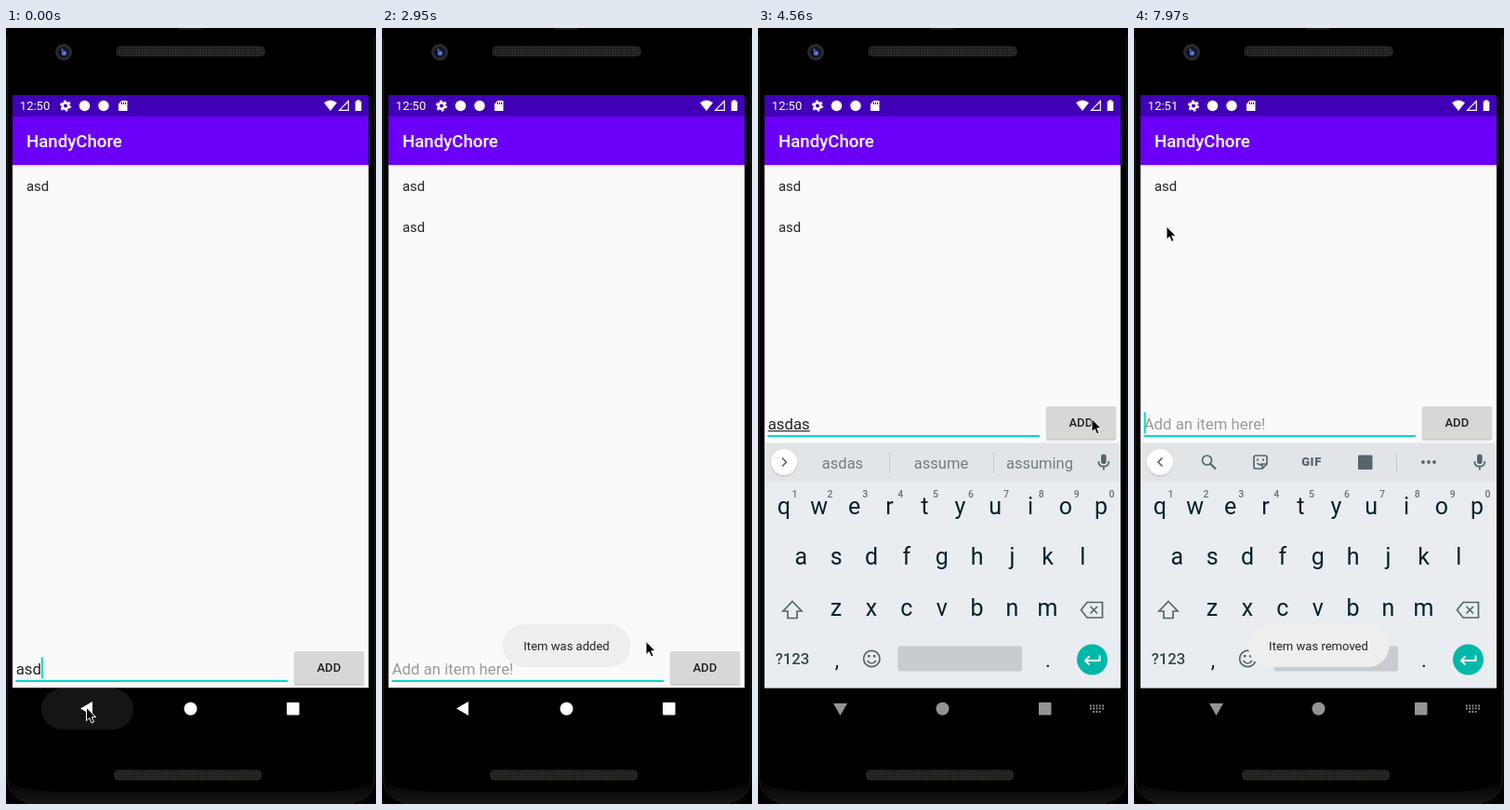
Recreate the animation shown at these times as an HTML page. Size 398 by 833 pixels, loop 8 s.

```html
<!DOCTYPE html>
<html lang="en">
<head>
<meta charset="utf-8">
<title>To-do app on a phone</title>
<style>
html, body { margin: 0; width: 100%; height: 100%; overflow: hidden; background: #000; }
svg { display: block; width: 398px; height: 833px; font-family: Roboto, "Open Sans", sans-serif; }
.mid { text-anchor: middle; }
.item { font-size: 14.9px; fill: #252525; }
.field { font-size: 16.78px; }
.small { font-size: 13.05px; }
.bold { font-weight: 500; }
.key { font-size: 25px; fill: #05212c; }
.hintkey { font-size: 10.5px; fill: #65727a; font-weight: 500; }
.word { font-size: 16.5px; fill: #727c82; }
.line { fill: none; stroke: #56646c; stroke-width: 1.7; }
</style>
</head>
<body>
<svg viewBox="0 0 398 833">
  <defs>
    <pattern id="mesh" width="3" height="3" patternUnits="userSpaceOnUse">
      <rect width="3" height="3" fill="#2a2a28"/><rect width="1.6" height="1.6" fill="#131312"/>
    </pattern>
    <linearGradient id="chin" x2="0" y2="1">
      <stop offset="0" stop-color="#030303"/><stop offset="1" stop-color="#171717"/>
    </linearGradient>
    <linearGradient id="shade" x2="0" y2="1">
      <stop offset="0" stop-opacity=".14"/><stop offset="1" stop-opacity="0"/>
    </linearGradient>
    <clipPath id="screen"><path d="M7 72H390V750H7Z"/></clipPath>
  </defs>

  <!-- phone body -->
  <rect width="398" height="833" fill="#000"/>
  <path d="M1.5 10V806Q3 826 24 832H374Q395 826 396.5 806V10" fill="none" stroke="#161616" stroke-width="1.5"/>
  <path d="M3 808Q20 820 60 820H338Q378 820 395 808Q392 826 374 833H24Q6 826 3 808Z" fill="url(#chin)"/>
  <path d="M185 0H211V2H185Z" fill="#151515"/>
  <rect x="119" y="20" width="159" height="10" rx="4" fill="url(#mesh)" stroke="#2c2c2b"/>
  <rect x="116.500" y="797" width="158" height="10" rx="4" fill="url(#mesh)" stroke="#2c2c2b"/>
  <circle cx="62" cy="26" r="9" fill="#2a2a2c"/>
  <circle cx="62" cy="26" r="6" fill="#10142a"/>
  <circle cx="62.500" cy="27" r="2.600" fill="#5672c4"/>
  <circle cx="60.500" cy="23.500" r="1" fill="#8792b8"/>

  <!-- app -->
  <path d="M7 147H390V708.500H7Z" fill="#fafafa"/>
  <path d="M7 147H390V150H7Z" fill="url(#shade)"/>
  <path d="M7 72H390V95H7Z" fill="#3f00b6"/>
  <path d="M7 95H390V147H7Z" fill="#6a00f7"/>
  <g fill="#fff">
    <text id="clock" class="small" x="14.800" y="88.300"></text>
    <circle cx="64" cy="83.500" r="3.300" fill="none" stroke="#fff" stroke-width="2.600"/>
    <circle cx="64" cy="83.500" r="5.200" fill="none" stroke="#fff" stroke-width="1.800" stroke-dasharray="2.720 2.725"/>
    <circle cx="84.500" cy="83.500" r="5.700"/>
    <circle cx="105" cy="83.500" r="5.700"/>
    <path d="M124.500 78H130.500V89H121V81.500Z"/>
    <path d="M124.500 79.500V82M126.500 79.500V82M128.500 79.500V82" stroke="#3f00b6"/>
    <path d="M342 80.300Q349 74.700 356 80.300L349 89Z"/>
    <path d="M358.500 88.300L368.300 78.500V88.300Z" fill="none" stroke="#fff" stroke-width="1.200"/>
    <path d="M375.700 78.500H377.700V77H380.300V78.500H382.300V89H375.700Z"/>
    <text class="bold" x="22" y="127.700" font-size="18.640">HandyChore</text>
  </g>
  <text class="item" x="22" y="174.700">asd</text>
  <text id="second" class="item" x="22" y="219.400">asd</text>
  <text id="third" class="item" x="22">asdas</text>

  <!-- input row -->
  <g id="row">
    <text id="entry" class="field" x="10.700" y="693.500"></text>
    <path id="compose" fill="#333"/>
    <path d="M10.500 700H303V702H10.500Z" fill="#03dac5"/>
    <rect id="caret" y="675.500" width="1.900" height="23" fill="#03dac5"/>
    <rect x="309.500" y="670.500" width="76" height="36" rx="2.500" fill="#000" opacity=".1"/>
    <rect x="310" y="669.500" width="75" height="35.500" rx="2" fill="#000" opacity=".12"/>
    <rect x="310" y="669" width="75" height="35" rx="2" fill="#d6d7d7"/>
    <rect id="press" x="310" y="669" width="75" height="35" rx="2" fill="#000"/>
    <text class="small bold mid" x="347.300" y="691.200" fill="#222">ADD</text>
  </g>

  <path d="M7 708.500H390V750H7Z" fill="#000"/>
  <rect id="ripple" x="38" y="709" width="99" height="44" rx="22" fill="#151515"/>

  <!-- keyboard -->
  <g clip-path="url(#screen)">
    <g id="board">
      <path d="M7 445.500H390V708.500H7Z" fill="#e9edf1"/>
      <path d="M7 445.500H390V487H7Z" fill="#e1e5e8"/>
      <circle cx="28" cy="467" r="14.500" fill="#000" opacity=".12"/>
      <circle cx="28" cy="466" r="14" fill="#fff"/>
      <path id="chevron" class="line"/>
      <g id="words">
        <path d="M141.500 455V478M253.500 455V478" stroke="#c4c9cc"/>
        <text class="word mid" x="91" y="472.500"></text>
        <text class="word mid" x="197" y="472.500"></text>
        <text class="word mid" x="303" y="472.500"></text>
      </g>
      <g id="tools" fill="#56646c">
        <circle class="line" cx="78.500" cy="464" r="5"/>
        <path class="line" d="M82 467.500L88 473.500" style="stroke-width:2.200"/>
        <path class="line" d="M131 459H141Q143 459 143 461V468L138 473H131Q129 473 129 471V461Q129 459 131 459ZM138 473V468H143M132.500 467Q135 470 137.500 468"/>
        <path d="M132 462.500H134V464.500H132ZM138 462.500H140V464.500H138Z"/>
        <text class="mid" x="191" y="470.300" font-size="13" font-weight="900" letter-spacing=".6">GIF</text>
        <rect x="241" y="458.500" width="15.500" height="15.500" rx="1"/>
        <path d="M282.500 456V476" stroke="#c4c9cc"/>
        <circle cx="311" cy="466" r="1.900"/><circle cx="317" cy="466" r="1.900"/><circle cx="323" cy="466" r="1.900"/>
      </g>
      <rect x="369" y="457.500" width="5.600" height="10.500" rx="2.800" fill="#56646c"/>
      <path class="line" d="M366.300 465Q366.300 470.700 371.800 470.700Q377.300 470.700 377.300 465M371.800 470.700V474.500"/>
      <g id="keys"></g>
      <path class="line" d="M37 615.500L47 626H42V633.500H32V626H27Z"/>
      <path class="line" d="M354 616.500H370.500V633H354L347.500 624.700ZM357.500 621L365 628.500M365 621L357.500 628.500"/>
      <text class="mid bold" x="37" y="683" font-size="16.700" fill="#34474f">?123</text>
      <text class="mid" x="85" y="685.500" font-size="22" fill="#05212c">,</text>
      <text class="mid" x="312" y="685.500" font-size="22" fill="#05212c">.</text>
      <circle class="line" cx="122.300" cy="677" r="8.700"/>
      <path class="line" d="M117.500 679Q122.300 685 127 679"/>
      <path d="M118 673H120.500V675.500H118ZM124 673H126.500V675.500H124Z" fill="#56646c"/>
      <rect x="150.500" y="663.500" width="133.500" height="27" rx="3" fill="#c8ccd0"/>
      <circle cx="359.500" cy="678" r="16.500" fill="#00b8a9"/>
      <path d="M367.500 673.500V679H352.500M356.500 674.500L352 679L356.500 683.500" fill="none" stroke="#fff" stroke-width="1.900"/>
    </g>
  </g>

  <!-- navigation -->
  <g id="nav">
    <path id="back" d="M80 730.500L93 723V738Z"/>
    <circle cx="198.500" cy="730.700" r="7"/>
    <rect x="302" y="724" width="13.500" height="13.500" rx=".8"/>
    <path id="mini" d="M357 727.500H372M357 730.500H372M360 734H369" fill="none" stroke-width="1.800" stroke-dasharray="1.800 1.500"/>
  </g>

  <g id="toast">
    <rect id="pill" y="640" height="46" rx="23" fill="#eee"/>
    <text id="note" class="small mid" x="198.500" y="668.300" fill="#242424"></text>
  </g>
  <path id="pointer" d="M0 0V14.200L3.200 11.200 5.600 16.500 8.100 15.400 5.800 10.200H10.200Z" stroke="#fff" stroke-width="1"/>
</svg>
<script>
const LOOP = 8000, TICK = 147.5;
const $ = id => document.getElementById(id);
const set = (id, attrs) => { for (const a in attrs) $(id).setAttribute(a, attrs[a]); };
const show = (id, alpha) => set(id, { opacity: alpha });

// Linear track through [tick, value] points
function track(k, ...points) {
  if (k <= points[0][0]) return points[0][1];
  for (let i = 1; i < points.length; i++) {
    const [a, u] = points[i - 1], [b, v] = points[i];
    if (k <= b) return u + (v - u) * (k - a) / (b - a);
  }
  return points.at(-1)[1];
}
// Last value whose tick has been reached
const step = (k, ...points) => points.findLast(p => p[0] <= k)[1];

const glyph = (cls, c, x, y) => `<text class="${cls} mid" x="${x}" y="${y}">${c}</text>`;
const keyRow = (letters, x, y) => [...letters].map((c, i) => glyph('key', c, x + i * 37.9, y)).join('');
$('keys').innerHTML = keyRow('qwertyuiop', 27.8, 521.8) + keyRow('asdfghjkl', 46.2, 576.3) +
  keyRow('zxcvbnm', 84, 631) +
  [...'1234567890'].map((c, i) => glyph('hintkey', c, 39.5 + i * 37.9, 503.5)).join('');

function draw(k) {
  const open = k >= 23, tools = k >= 32;
  $('clock').textContent = k < 35 ? '12:50' : '12:51';

  show('second', step(k, [0, 0], [9, .5], [10, 1], [44, .38], [45, 0]));
  show('third', step(k, [0, 0], [32, .4], [33, 1], [54, 0]));
  set('third', { y: track(k, [45, 264.1], [47, 219.4]) });

  const typed = step(k, [0, 'asd'], [9, ''], [23, 'a'], [24, 'as'], [25, 'asd'], [26, 'asda'], [27, 'asdas'], [32, '']);
  const entry = $('entry');
  entry.textContent = typed || 'Add an item here!';
  entry.setAttribute('fill', typed ? '#222' : '#9a9a9a');
  const end = 10.7 + (typed ? entry.getComputedTextLength() : 0);
  set('compose', { d: typed && open ? `M10.700 695H${end}V696.200H10.700Z` : '' });
  set('caret', { x: end });
  show('caret', step(k, [0, 1], [3, 0], [6, 1], [12, 0], [16, 1], [19, 0], [22, 1], [30, 0], [32, 1],
    [35, 0], [38, 1], [42, 0], [45, 1], [48, 0], [52, 1]));
  set('row', { transform: `translate(0 ${open ? -263 : 0})` });
  show('press', step(k, [0, 0], [8, .1], [9, .06], [10, 0], [32, .1], [33, .06], [34, 0]));
  show('ripple', track(k, [0, 1], [3, 0]));

  const rise = track(k, [23, 0], [25, 1]);
  set('board', { transform: `translate(0 ${82 * (1 - rise)})`, opacity: open ? .3 + .7 * rise : 0 });
  show('words', tools ? 0 : 1);
  show('tools', tools ? 1 : 0);
  set('chevron', { d: tools ? 'M30.500 461.500L26 466L30.500 470.500' : 'M26 461.500L30.500 466L26 470.500' });
  const words = step(k, [0, 'as ask asked'], [25, 'asd ask asked'], [27, 'asdas assume assuming']).split(' ');
  document.querySelectorAll('.word').forEach((w, i) => w.textContent = words[i]);

  const tone = step(k, [0, '#fff'], [24, '#dcdcdc'], [25, '#949494']);
  set('nav', { fill: tone, stroke: 'none' });
  set('mini', { stroke: tone, opacity: k >= 24 ? 1 : 0 });
  set('back', { transform: `rotate(${step(k, [0, 0], [24, -165], [25, -90])} 88 730)` });

  const removed = k >= 46, width = removed ? 152 : 138;
  $('note').textContent = removed ? 'Item was removed' : 'Item was added';
  set('pill', { x: 198.7 - width / 2, width });
  show('toast', track(k, [9, 0], [12, 1], [22, 1], [23, .8], [24, .4], [25, 0], [33, 0], [36, 1],
    [44, 1], [45, .6], [46, .2], [48, 1]));

  const x = track(k, [0, 86.5], [1, 95], [6, 345], [7, 350.5], [13, 350], [14, 349], [16, 310], [18, 284],
    [26, 284], [30, 359], [33, 359], [38, 30], [45, 30], [47, 35]);
  const y = track(k, [0, 729.5], [1, 727], [6, 693], [7, 689.5], [13, 689.5], [14, 692], [16, 720], [18, 658.5],
    [26, 658.5], [30, 419.5], [33, 419.5], [38, 214.5], [45, 214.5], [47, 213]);
  set('pointer', { transform: `translate(${x} ${y})` });
}

function frame() {
  draw(Math.floor((performance.now() % LOOP + 14) / TICK));
  requestAnimationFrame(frame);
}
frame();
</script>
</body>
</html>
```
